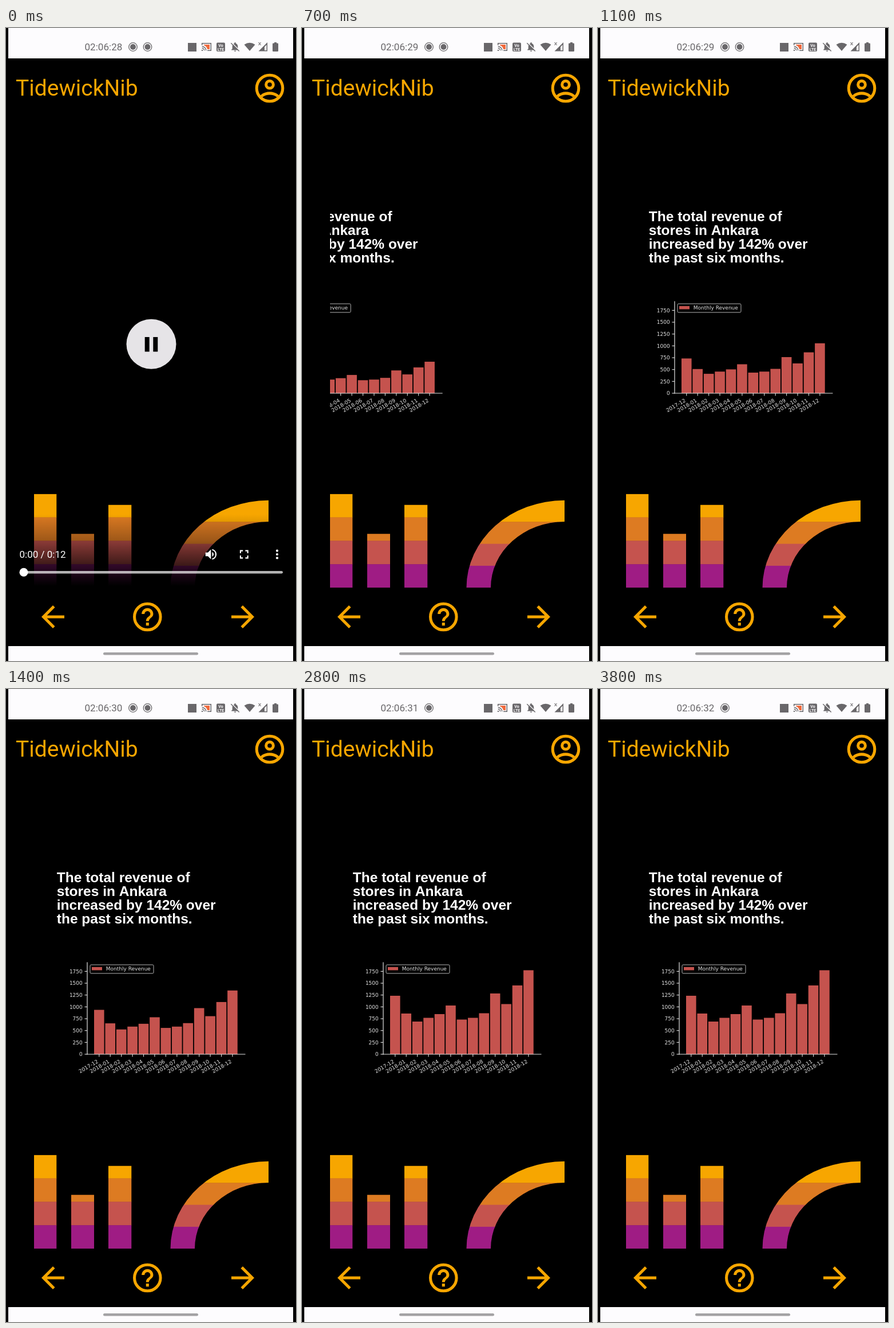
Animation, 507 px wide and 1104 px high, one loop 3900 ms. Source, as an HTML page with a canvas:

```html
<!DOCTYPE html>
<html lang="en">
<head>
<meta charset="utf-8">
<title>TidewickNib</title>
<style>
  html, body { margin: 0; width: 100%; height: 100%; overflow: hidden; background: #000; }
  canvas { display: block; }
</style>
</head>
<body>
<canvas id="stage" width="507" height="1104"></canvas>
<script>
const ctx = document.getElementById('stage').getContext('2d');
const LOOP = 3900, STEP = 100;
const GOLD = '#f7a600', RED = '#c5534e', PAPER = '#fdfcfe', GREY = '#69676a';
const BANDS = [GOLD, '#dd7b22', RED, '#9f1c84'];
const ROBOTO = 'Roboto, sans-serif', DEJAVU = '"DejaVu Sans", sans-serif';
const HEADLINE = ['The total revenue of', 'stores in Ankara', 'increased by 142% over', 'the past six months.'];
const MONTHS = ['2017-12', ...Array.from({ length: 12 }, (_, i) => '2018-' + String(i + 1).padStart(2, '0'))];
const BAR_HEIGHTS = [102, 71, 57, 63.5, 70, 85, 60.5, 63.5, 71.5, 106, 87.5, 120, 146.5];

const clamp = v => Math.min(1, Math.max(0, v));

function rect(x, y, w, h, color) {
  ctx.fillStyle = color;
  ctx.fillRect(x, y, w, h);
}

function disc(x, y, r, color) {
  ctx.fillStyle = color;
  ctx.beginPath();
  ctx.arc(x, y, r, 0, Math.PI * 2);
  ctx.fill();
}

function ring(x, y, r, width, color) {
  ctx.strokeStyle = color;
  ctx.lineWidth = width;
  ctx.beginPath();
  ctx.arc(x, y, r, 0, Math.PI * 2);
  ctx.stroke();
}

function pill(x, y, w, h, r, color) {
  ctx.fillStyle = color;
  ctx.beginPath();
  ctx.roundRect(x, y, w, h, r);
  ctx.fill();
}

function line(x1, y1, x2, y2, width, color) {
  ctx.strokeStyle = color;
  ctx.lineWidth = width;
  ctx.beginPath();
  ctx.moveTo(x1, y1);
  ctx.lineTo(x2, y2);
  ctx.stroke();
}

function text(str, x, y, font, color, align = 'left') {
  ctx.font = font;
  ctx.fillStyle = color;
  ctx.textAlign = align;
  ctx.fillText(str, x, y);
}

// Icons are drawn on a 24-unit grid centred on (cx, cy).
function icon(cx, cy, scale, draw) {
  ctx.save();
  ctx.translate(cx, cy);
  ctx.scale(scale, scale);
  ctx.translate(-12, -12);
  draw();
  ctx.restore();
}

function fillPath(d, color) {
  ctx.fillStyle = color;
  ctx.fill(new Path2D(d));
}

function strokePath(d, width, color) {
  ctx.strokeStyle = color;
  ctx.lineWidth = width;
  ctx.stroke(new Path2D(d));
}

function drawStatusBar(t) {
  rect(4, 0, 498, 53, PAPER);
  const seconds = 28 + Math.floor((t + 800) / 1000);
  text('02:06:' + seconds, 137.5, 38.5, '17.1px ' + ROBOTO, GREY);
  for (const x of t < 2300 ? [222, 247.5] : [222]) {
    ring(x, 33, 7.3, 1.3, GREY);
    disc(x, 33, 5, GREY);
  }
  rect(318, 26, 15, 15, GREY);
  icon(350.5, 33, 0.78, () => {
    fillPath('M6 7H19V17H14Q12 10 6 8Z', '#f0693c');
    strokePath('M2 8V4H22V20H14M2 11A9 9 0 0 1 11 20M2 15A5 5 0 0 1 7 20', 1.9, GREY);
    disc(2.4, 19.6, 1.5, GREY);
  });
  pill(368, 25.5, 15, 15.5, 2, GREY);
  text('Vo', 375.5, 32.5, 'bold 7px ' + ROBOTO, PAPER, 'center');
  text('LTE', 375.5, 39.5, 'bold 7px ' + ROBOTO, PAPER, 'center');
  icon(400.5, 33, 0.8, () => {
    fillPath('M4 19V18L6 16V11C6 7.5 8 5.2 10.5 4.6V3.5A1.5 1.5 0 0 1 13.5 3.5V4.6C16 5.2 18 7.5 18 11V16L20 18V19ZM10 20H14A2 2 0 0 1 10 20Z', GREY);
    line(4.5, 2.5, 22, 20, 1.8, PAPER);
    line(3, 3.5, 21, 21.5, 1.8, GREY);
  });
  fillPath('M426 40L416.5 29Q426 22.5 435.5 29Z', GREY);
  fillPath('M441.5 40.5L457 25V40.5Z', GREY);
  fillPath('M452 33L455.5 29.3V39H452Z', PAPER);
  line(441.5, 25, 445.5, 30, 1.1, GREY);
  line(445.5, 25, 441.5, 30, 1.1, GREY);
  pill(466, 26.5, 10, 14.5, 1.3, GREY);
  rect(469, 25, 4, 2, GREY);
}

function drawAppBars() {
  text('TidewickNib', 17, 118, '39px ' + ROBOTO, GOLD);
  icon(461, 105, 2.53, () => {
    ring(12, 12, 9, 2, GOLD);
    ring(12, 9.5, 2.5, 2, GOLD);
    strokePath('M6.3 17.7C7.4 16.1 10.4 15.5 12 15.5S16.6 16.1 17.7 17.7', 2, GOLD);
  });
  const arrow = 'M20 11H7.83l5.59-5.59L12 4l-8 8 8 8 1.41-1.41L7.83 13H20v-2z';
  icon(82, 1027, 2.5, () => fillPath(arrow, GOLD));
  icon(414, 1027, 2.5, () => {
    ctx.translate(24, 0);
    ctx.scale(-1, 1);
    fillPath(arrow, GOLD);
  });
  icon(247.3, 1027, 2.53, () => {
    ring(12, 12, 9, 2, GOLD);
    fillPath('M11 16h2v2h-2zM12 6c-2.21 0-4 1.79-4 4h2c0-1.1.9-2 2-2s2 .9 2 2c0 2-3 1.75-3 5h2c0-2.25 3-2.5 3-5 0-2.21-1.79-4-4-4z', GOLD);
  });
  rect(4, 1078, 498, 26, PAPER);
  pill(170, 1089, 166, 4.5, 2.2, '#a3a2a4');
}

function drawBands(top, height) {
  BANDS.forEach((color, i) => rect(0, top + i * height, 507, height + 0.5, color));
}

function drawArtwork() {
  ctx.save();
  ctx.beginPath();
  for (const [x, w, top] of [[49, 39.3, 812.7], [114, 40, 882.3], [179, 40.3, 831.7]]) {
    ctx.rect(x, top, w, 976 - top);
  }
  ctx.clip();
  drawBands(812.5, 40.9);
  ctx.restore();

  ctx.save();
  ctx.beginPath();
  ctx.ellipse(459, 976, 171.5, 152.3, 0, Math.PI, Math.PI * 1.5);
  ctx.ellipse(459, 976, 129, 115, 0, Math.PI * 1.5, Math.PI, true);
  ctx.closePath();
  ctx.clip();
  drawBands(823, 38.3);
  ctx.restore();
}

function drawChart(growth) {
  const ink = '#e4e4e4', label = '9px ' + DEJAVU;
  const barX = i => 154 + i * 19.43;
  BAR_HEIGHTS.forEach((h, i) => rect(barX(i), 637 - h * growth, 17.6, h * growth, RED));
  line(142, 476.5, 142, 637.6, 1.2, ink);
  line(141.4, 637, 418.5, 637, 1.2, ink);
  for (let i = 0; i < 8; i++) {
    const y = 637 - i * 20.65;
    line(137.5, y, 142, y, 1.1, ink);
    text(i * 250, 133.8, y + 3.2, label, ink, 'right');
  }
  MONTHS.forEach((month, i) => {
    const x = barX(i) + 8.8;
    line(x, 637, x, 641.5, 1.1, ink);
    ctx.save();
    ctx.translate(x - 0.8, 651.5);
    ctx.rotate(-Math.PI / 6);
    text(month, 0, 0, label, ink, 'right');
    ctx.restore();
  });
  ctx.beginPath();
  ctx.roundRect(147, 481, 111, 15, 1.8);
  ctx.fillStyle = 'rgba(0,0,0,.8)';
  ctx.fill();
  ctx.strokeStyle = '#b5b5b5';
  ctx.lineWidth = 1;
  ctx.stroke();
  rect(150, 485, 18, 5.5, RED);
  text('Monthly Revenue', 174.8, 491, label, ink);
}

function drawVideo(t) {
  const speed = 0.412;
  ctx.save();
  ctx.beginPath();
  ctx.rect(49, 150, 410, 830);
  ctx.clip();

  ctx.save();
  ctx.translate(Math.min(0, (t - 1098) * speed), 0);
  HEADLINE.forEach((row, i) =>
    text(row, 88.8, 337.4 + i * 24, 'bold 24.5px "Liberation Sans", Arial, sans-serif', '#fff'));
  ctx.restore();

  ctx.save();
  ctx.translate(Math.min(0, (t - 1119.5) * speed), 0);
  drawChart(clamp((t - 15) / 1825));
  ctx.restore();

  drawArtwork();
  ctx.restore();
}

function drawControls(t) {
  const fade = clamp(1 - (t - 100) / 525);
  if (!fade) return;
  const scrim = ctx.createLinearGradient(0, 848, 0, 973);
  [[0, 0], [0.36, 0.28], [0.7, 0.68], [1, 1]].forEach(([at, a]) => scrim.addColorStop(at, `rgba(0,0,0,${a})`));
  ctx.save();
  ctx.globalAlpha = fade ** 1.25;
  rect(4, 848, 498, 130, scrim);

  ctx.globalAlpha = fade;
  disc(254, 551.3, 43.5, '#e6e4e7');
  ctx.globalAlpha = 1;
  rect(242.7, 539, 8, 25.5, '#000');
  rect(257.3, 539, 8, 25.5, '#000');

  ctx.globalAlpha = fade;
  const shade = Math.round(255 * fade ** 2);
  const ink = `rgb(${shade},${shade},${shade})`;
  text('0:00 / 0:12', 23.5, 924, '17px ' + ROBOTO, ink);
  icon(358.3, 918, 1.06, () => {
    fillPath('M3 9v6h4l5 5V4L7 9zM14 8Q16.5 9.3 16.5 12T14 16Z', ink);
    strokePath('M14 4.2A8 8 0 0 1 14 19.8', 2, ink);
  });
  icon(416.3, 918, 1.06, () =>
    strokePath('M6 10V6H10M14 6H18V10M18 14V18H14M10 18H6V14', 2, ink));
  for (const y of [911.7, 918, 924.3]) disc(474, y, 2.1, ink);

  const knob = t < 300 ? 31 : 41;
  ctx.globalAlpha = fade * 0.7;
  pill(24, 947, 460, 4.6, 2.3, ink);
  ctx.globalAlpha = fade;
  pill(24, 947, knob - 24, 4.6, 2.3, ink);
  disc(knob, 949.3, 7.5, ink);
  ctx.restore();
}

function frame(now) {
  const t = Math.floor((now % LOOP) / STEP) * STEP;
  rect(0, 0, 507, 1104, '#000');
  drawStatusBar(t);
  drawVideo(t);
  drawControls(t);
  drawAppBars();
  requestAnimationFrame(frame);
}
requestAnimationFrame(frame);
</script>
</body>
</html>
```
